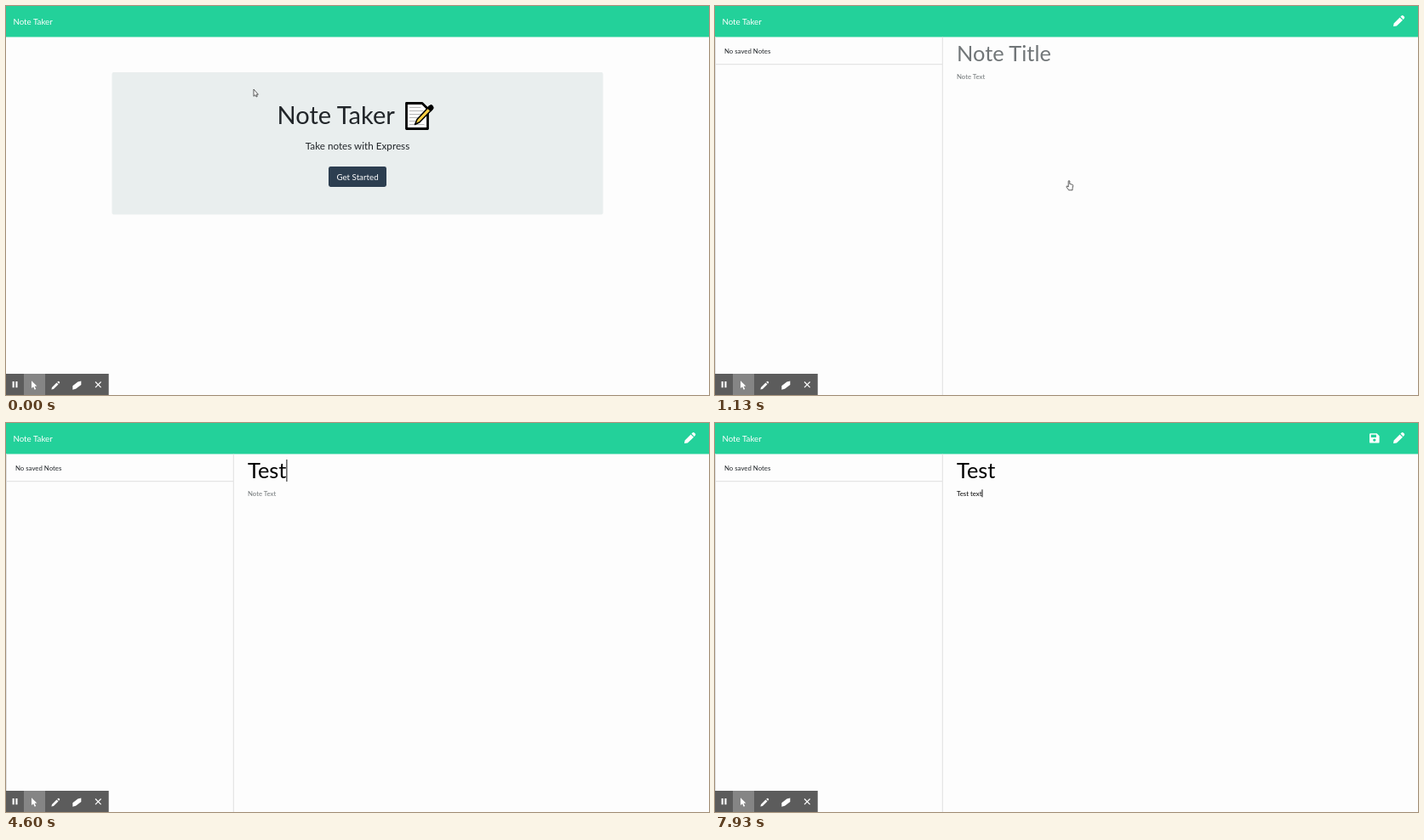
An HTML page for the animation above (8000 ms loop, 826x458 px).

```html
<!DOCTYPE html>
<html lang="en">
<head>
<meta charset="utf-8">
<title>Note Taker</title>
<style>
  html, body { margin: 0; width: 100%; height: 100%; overflow: hidden; background: #fdfdfd; }
  svg { display: block; font-family: Lato, sans-serif; }
  text { white-space: pre; fill: #212529; }
  .light { fill: #fff; }
  .mid { text-anchor: middle; }
</style>
</head>
<body>
<svg width="826" height="458" viewBox="0 0 826 458">
  <rect width="826" height="458" fill="#fdfdfd"/>
  <rect width="826" height="36.5" fill="#23d19a"/>
  <text class="light" x="8.4" y="21.7" font-size="9.75">Note Taker</text>

  <g id="home">
    <rect x="124.5" y="78" width="577" height="167.5" rx="2" fill="#e9eeee"/>
    <text x="318.4" y="139.3" font-size="29.1">Note Taker</text>
    <g stroke-linejoin="round" stroke-linecap="round">
      <path d="M470.5 114.5H489L495.5 121V144.5H470.5Z" fill="#fff" stroke="#000" stroke-width="2.8"/>
      <path d="M474.5 119.5H487M474.5 123.5H490M474.5 127.5H488M474.5 131.5H484M474.5 135.5H481M474.5 139.5H491" fill="none" stroke="#b5b5b5" stroke-width="1.2"/>
      <path d="M480.5 139.5L483 133.5L497 118.5Q499 116 501 118.2Q502.4 120 500.4 122L486 136.8Z" fill="#f9cf45" stroke="#000" stroke-width="1.6"/>
      <path d="M495.5 120L497 118.5Q499 116 501 118.2Q502.4 120 500.4 122L499 123.5Z" stroke="#000" stroke-width="1.6"/>
    </g>
    <text class="mid" x="413" y="169.4" font-size="11.7">Take notes with Express</text>
    <rect id="ring" x="377.4" y="187.4" width="71.2" height="27.2" rx="3.6" fill="#2c3e50" fill-opacity=".5"/>
    <rect id="button" x="379" y="189" width="68" height="24" rx="2.4"/>
    <text class="light mid" x="413" y="204.5" font-size="9.75">Get Started</text>
  </g>

  <g id="notes">
    <path d="M.5 36.5V458M267.3 36.5V458M0 68.7H267" fill="none" stroke="#dfdfdf"/>
    <text x="11" y="55.6" font-size="7.8">No saved Notes</text>
    <text id="title" x="284" y="65.2" font-size="25.4"></text>
    <text id="body" x="284" y="85.7" font-size="7.8"></text>
    <rect id="caret" width="1" fill="#111"/>
    <g class="light">
      <path d="M797 24L797.6 20.4L804.6 13.4L808 16.8L800.9 23.4ZM805.4 12.6L807 11.2Q807.9 10.6 808.8 11.4L810 12.7Q810.6 13.6 809.9 14.4L808.7 16Z"/>
      <path id="save" fill-rule="evenodd" d="M770.2 12.2H777.6L780.6 15.2V22.4Q780.6 23.6 779.4 23.6H770.2Q769 23.6 769 22.4V13.4Q769 12.2 770.2 12.2ZM770.7 13.8V17H776.9V13.8ZM774.8 18.4A1.7 1.7 0 1 0 774.8 21.8A1.7 1.7 0 1 0 774.8 18.4Z"/>
    </g>
  </g>

  <g id="toolbar">
    <rect y="433" width="120.7" height="25" fill="#5c5c5c"/>
    <rect x="21" y="433" width="25" height="25" fill="#858585"/>
    <g class="light">
      <path d="M7.6 442H9.7V449.3H7.6ZM11.4 442H13.5V449.3H11.4Z"/>
      <path d="M30 441.3V450L32.1 448.3L33.7 451.7L35.2 451L33.6 447.8L36.3 447.4Z"/>
      <path d="M53.4 451.4L54 448.9L59.5 443.5L61.5 445.5L55.9 450.9ZM60.2 442.8L61.2 441.9Q61.8 441.5 62.4 442L63 442.7Q63.4 443.3 63 443.8L62.1 444.8Z"/>
      <path d="M78.3 447.3L84.4 442.4L88.3 441.5V446L82 450.7L78.3 451.7Z"/>
    </g>
    <path d="M105 442.5L111.6 449.1M111.6 442.5L105 449.1" stroke="#fff" stroke-width="1.2"/>
  </g>

  <g id="pointer" fill="#fff" stroke="#333" stroke-width=".8" stroke-linejoin="round">
    <path id="arrow" d="M.5 0V8.3L2.3 6.7L3.6 9L4.8 8.4L3.7 6.2H5.9Z"/>
    <path id="hand" d="M-.8 .8Q0 -.4 .8 .8V4.2L4 5Q4.8 5.3 4.7 6.2L4 9.5V11.5H-.3L-3 7.8Q-3.2 6.6 -2 6.6L-.8 7.7Z"/>
  </g>
</svg>

<script>
const LOOP = 8000, CLICK = 960, OPEN = 1130, POINTER_GONE = 1860;
const TITLE_FOCUS = 2930, BODY_FOCUS = 5460;
const titleField = { id: "title", hint: "Note Title", value: "Test", start: 3600, step: 200, top: 43, height: 26 };
const bodyField = { id: "body", hint: "Note Text", value: "Test text", start: 6530, step: 140, top: 78.3, height: 9 };

const el = id => document.getElementById(id);
const show = (id, visible) => el(id).style.display = visible ? "" : "none";
const clamp = x => Math.max(0, Math.min(1, x));
const progress = (t, from, to) => clamp((t - from) / (to - from));
const smooth = x => x * x * (3 - 2 * x);
const mix = (a, b, k) => a + (b - a) * k;

const typedCount = (field, t) =>
  Math.max(0, Math.min(field.value.length, Math.floor((t - field.start) / field.step) + 1));

function drawField(field, t) {
  const count = typedCount(field, t), node = el(field.id);
  node.textContent = count ? field.value.slice(0, count) : field.hint;
  node.style.fill = count ? "#000" : "#717678";
}

function drawCaret(t) {
  const inBody = t >= BODY_FOCUS;
  const field = inBody ? bodyField : titleField;
  const count = typedCount(field, t);
  // Each keystroke restarts the blink.
  const since = count ? field.start + (count - 1) * field.step : inBody ? BODY_FOCUS : TITLE_FOCUS;
  show("caret", t >= TITLE_FOCUS && (t - since) % 1000 < 500);
  const caret = el("caret");
  caret.setAttribute("x", 284 + (count ? el(field.id).getComputedTextLength() : 0));
  caret.setAttribute("y", field.top);
  caret.setAttribute("height", field.height);
}

function drawPointer(t) {
  const reach = smooth(progress(t, 60, 660)), settle = smooth(progress(t, 660, 860));
  const x = mix(mix(290.5, 419, reach), 416, settle);
  const y = mix(mix(98, 210, reach), 205.3, settle);
  const over = x > 379 && y > 189;
  el("pointer").setAttribute("transform", `translate(${x} ${y})`);
  show("pointer", t < POINTER_GONE);
  show("arrow", !over);
  show("hand", over);
  el("button").style.fill = t >= CLICK ? "#1a252f" : over ? "#1e2b37" : "#2c3e50";
  el("ring").style.opacity = progress(t, CLICK, CLICK + 100);
}

function draw(t) {
  show("home", t < OPEN);
  show("notes", t >= OPEN);
  drawPointer(t);
  drawField(titleField, t);
  drawField(bodyField, t);
  drawCaret(t);
  show("save", typedCount(bodyField, t) > 0);
}

const began = performance.now();
function frame() {
  draw((performance.now() - began) % LOOP);
  requestAnimationFrame(frame);
}
frame();
</script>
</body>
</html>
```
